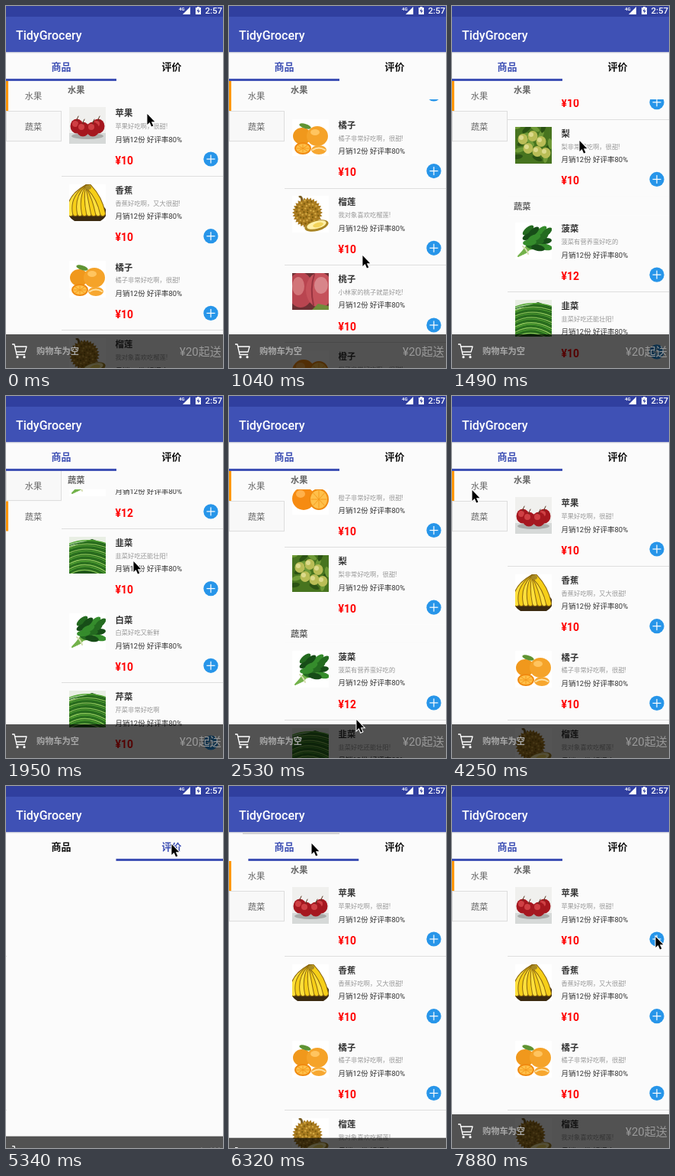
Animation, 285 px wide and 473 px high, one loop 8000 ms. Source, as an HTML page with a canvas:

```html
<!DOCTYPE html>
<html lang="zh-CN">
<head>
<meta charset="utf-8">
<title>Shop menu</title>
<style>
html, body { margin: 0; width: 100%; height: 100%; overflow: hidden; background: #fafafa; }
canvas { display: block; width: 285px; height: 473px; }
</style>
</head>
<body>
<canvas id="stage" width="285" height="473"></canvas>
<script>
const ctx = document.getElementById('stage').getContext('2d');
const W = 285, H = 473, LOOP = 8000;
const TOP = 98, HEAD = 24, ROW = 100.7, TAB = 145;
const BLUE = '#3f51b5', PAGE = '#fbfbfb';
const FONT = 'Roboto, "Noto Sans CJK SC", "Noto Sans CJK", sans-serif';

const fruit = [
  ['苹果', '苹果好吃啊，很甜!', 10, apples],
  ['香蕉', '香蕉好吃啊，又大很甜!', 10, bananas],
  ['橘子', '橘子非常好吃啊，很甜!', 10, tangerines],
  ['榴莲', '我对象喜欢吃榴莲!', 10, durian],
  ['桃子', '小林家的桃子就是好吃!', 10, peaches],
  ['橙子', '橙子非常好吃啊，很甜!', 10, oranges],
  ['梨', '梨非常好吃啊，很甜!', 10, pears]
];
const greens = [
  ['菠菜', '菠菜有营养蛮好吃的', 12, spinach],
  ['韭菜', '韭菜好吃还能壮阳!', 10, leeks],
  ['白菜', '白菜好吃又新鲜', 10, spinach],
  ['芹菜', '芹菜非常好吃啊', 10, leeks]
];
const GREENS_AT = HEAD + fruit.length * ROW;

// Keyframes: time, then values
const scrollKeys = [
  [0, 0], [40, 0], [180, 70], [380, 135], [600, 170], [810, 183], [1000, 183], [1040, 185],
  [1180, 300], [1340, 450], [1490, 577], [1650, 695], [1800, 755], [1950, 778], [2120, 778],
  [2260, 745], [2400, 655], [2530, 529], [2680, 380], [2850, 255], [3050, 160], [3270, 120],
  [3530, 120]
];
const cursorKeys = [
  [0, 185, 140], [160, 184, 113], [300, 184, 125], [880, 176, 345], [1040, 175, 325],
  [1380, 167, 165], [1490, 167, 175], [1900, 167, 215], [2130, 167, 215], [2530, 167, 422],
  [2640, 167, 430], [3270, 43, 157], [3300, 42, 156], [3560, 42, 156], [3980, 26, 122],
  [4290, 26, 122], [4960, 217, 75], [5670, 217, 75], [5890, 108, 74], [6400, 108, 74],
  [6970, 198, 290], [7760, 263, 199], [7880, 267, 196], [8000, 267, 196]
];

const clamp = v => Math.max(0, Math.min(1, v));
const smooth = u => u * u * (3 - 2 * u);
const ramp = (t, from, to) => smooth(clamp((t - from) / (to - from)));

function sample(keys, t, ease = u => u) {
  const i = keys.findIndex(k => k[0] > t);
  if (i < 0) return keys[keys.length - 1].slice(1);
  const a = keys[i - 1], b = keys[i], u = ease((t - a[0]) / (b[0] - a[0]));
  return a.slice(1).map((v, j) => v + (b[j + 1] - v) * u);
}

function scrollAt(t) {
  if (t < 3530) return sample(scrollKeys, t)[0];
  return t < 4250 ? GREENS_AT : 0;
}

function rect(x, y, w, h, color) {
  ctx.fillStyle = color;
  ctx.fillRect(x, y, w, h);
}

function text(s, x, y, size, color, weight = 400, align = 'left') {
  ctx.font = `${weight} ${size}px ${FONT}`;
  ctx.fillStyle = color;
  ctx.textAlign = align;
  ctx.fillText(s, x, y + size * 0.37);
}

function blob(x, y, rx, ry, color, turn = 0) {
  ctx.fillStyle = color;
  ctx.beginPath();
  ctx.ellipse(x, y, rx, ry, turn, 0, Math.PI * 2);
  ctx.fill();
}

function shape(points, fill, stroke, width = 1) {
  ctx.beginPath();
  points.forEach(([x, y]) => ctx.lineTo(x, y));
  ctx.closePath();
  if (stroke) {
    ctx.strokeStyle = stroke;
    ctx.lineWidth = width;
    ctx.stroke();
  }
  if (fill) {
    ctx.fillStyle = fill;
    ctx.fill();
  }
}

function curve(x1, y1, cx, cy, x2, y2, color, width) {
  ctx.strokeStyle = color;
  ctx.lineWidth = width;
  ctx.lineCap = 'round';
  ctx.beginPath();
  ctx.moveTo(x1, y1);
  ctx.quadraticCurveTo(cx, cy, x2, y2);
  ctx.stroke();
}

// Produce pictures, each on a 48 px square
function apples() {
  rect(0, 0, 48, 48, '#f0f0ee');
  rect(0, 34, 48, 14, '#d6d9d8');
  blob(24, 38, 21, 4, '#a9aaa8');
  for (const [x, y] of [[10, 25], [38, 25], [18, 29], [31, 29]]) {
    blob(x, y, 8.5, 9.5, '#a5171f');
    blob(x - 2, y - 3, 4, 4, '#cf4044');
    curve(x, y - 7, x, y - 10, x + 2, y - 13, '#5a3a24', 1);
  }
}

function bananas() {
  rect(0, 0, 48, 48, '#fff');
  blob(24, 37, 25, 15, '#3b2a10');
  for (let i = 0; i < 8; i++) {
    const x = 2 + i * 6;
    curve(23 + i * 0.5, 4, x - 4, 18, x, 38, '#8a6610', 8);
    curve(23 + i * 0.5, 4, x - 4, 18, x, 38, i % 2 ? '#f6cf18' : '#ffe03c', 6);
  }
  blob(25, 4, 4, 3, '#a88a24');
}

function slice(x, y, rx, ry) {
  blob(x, y, rx, ry, '#f08a10');
  blob(x, y, rx - 2, ry - 2, '#ffc04a');
  for (let i = 0; i < 8; i++) {
    const a = i * Math.PI / 4;
    curve(x, y, x, y, x + Math.cos(a) * (rx - 3), y + Math.sin(a) * (ry - 3), '#f59a1c', 1);
  }
}

function tangerines() {
  rect(0, 0, 48, 48, '#fff');
  blob(13, 22, 12, 11, '#f0981c');
  blob(33, 22, 14, 13, '#f5a329');
  blob(30, 17, 6, 4, '#ffc560');
  blob(17, 9, 8, 3, '#5f9434', 0.3);
  slice(14, 38, 11, 8);
  blob(35, 40, 10, 6, '#f7a730');
  curve(27, 40, 35, 35, 43, 40, '#ffe1a0', 2);
}

function durian() {
  rect(0, 0, 48, 48, '#fff');
  const spikes = Array.from({ length: 56 }, (_, i) => {
    const a = i * Math.PI / 28, r = i % 2 ? 17 : 20;
    return [20 + Math.cos(a) * r, 22 + Math.sin(a) * r];
  });
  shape(spikes, '#a97b20');
  for (let i = 0; i < 50; i++) {
    const a = i * 2.4, r = Math.sqrt(i) * 2.3;
    blob(20 + Math.cos(a) * r, 22 + Math.sin(a) * r, 1.2, 1.2, i % 2 ? '#d4aa42' : '#81600f');
  }
  curve(13, 5, 12, 1, 10, 1, '#7c6127', 3);
  blob(32, 39, 16, 7, '#a98524', -0.25);
  blob(32, 38, 13, 5, '#fff0a8', -0.25);
  blob(34, 38, 7, 3, '#f2d45c', -0.25);
}

function peaches() {
  rect(0, 0, 48, 48, '#6d3034');
  blob(11, 22, 17, 23, '#b94550');
  blob(36, 22, 18, 23, '#c5525b');
  blob(8, 17, 8, 12, '#d27579');
  blob(38, 16, 9, 11, '#d8858a');
  curve(29, 2, 23, 20, 28, 42, '#983440', 2);
  shape([[26, 48], [34, 40], [48, 43], [48, 48]], '#718c3b');
}

function oranges() {
  rect(0, 0, 48, 48, '#fff');
  blob(15, 27, 15, 15, '#f68b12');
  blob(11, 21, 6, 5, '#ffb14b');
  slice(35, 28, 13, 14);
}

function pears() {
  rect(0, 0, 48, 48, '#47741f');
  for (let i = 0; i < 16; i++)
    blob(i * 17 % 48, i * 29 % 48, 7, 3, i % 2 ? '#2b5214' : '#6f9a37', i);
  for (const [x, y] of [[10, 16], [23, 12], [34, 19], [17, 28], [29, 32], [40, 34]]) {
    blob(x, y, 6.5, 7, '#b9bd56');
    blob(x - 2, y - 2, 3, 3, '#dcda8c');
  }
}

function spinach() {
  rect(0, 0, 48, 48, '#fff');
  for (let i = 0; i < 9; i++)
    curve(4 + i * 1.5, 44 - i * 0.7, 16, 32, 28 + i * 1.7, 10 + i * 3, '#74b34c', 2);
  for (let i = 0; i < 14; i++)
    blob(17 + i * 11 % 27, 10 + i * 7 % 27, 9, 4, ['#246b20', '#358c2c', '#174d18'][i % 3], -0.7 + i % 4 * 0.3);
  curve(10, 31, 15, 35, 17, 41, '#d5ddb0', 2);
}

function leeks() {
  rect(0, 0, 48, 48, '#20571a');
  shape([[0, 0], [48, 0], [48, 9], [30, 3], [0, 13]], '#e9efe4');
  for (let i = 0; i < 18; i++)
    curve(-2, 10 + i * 2.4, 22, i * 2, 50, 9 + i * 2.7, ['#52a832', '#2e7a21', '#8bcb58'][i % 3], 1.3);
}

function row([name, note, price, picture], y, lined) {
  if (y > H || y + ROW < TOP) return;
  ctx.save();
  ctx.translate(83, Math.round(y + 10));
  ctx.beginPath();
  ctx.rect(0, 0, 48, 48);
  ctx.clip();
  picture();
  ctx.restore();
  text(name, 143.5, y + 18, 11.4, '#333', 700);
  text(note, 143.5, y + 35, 8.3, '#999');
  text('月销12份 好评率80%', 143.5, y + 52, 9.5, '#333');
  text('¥' + price, 143.5, y + 79.5, 14, '#f00', 700);
  const cy = y + 78;
  blob(269, cy, 9.6, 9.6, '#2795e9');
  rect(263.5, cy - 0.6, 11, 1.2, '#fff');
  rect(268.4, cy - 5.5, 1.2, 11, '#fff');
  if (lined) rect(73, Math.round(y + ROW - 0.7), W - 73, 1, '#dedede');
}

function heading(label, y) {
  rect(73, y, W - 73, HEAD, PAGE);
  text(label, 81, y + 12.3, 11.2, '#666', 700);
}

function menu(selected) {
  rect(0, TOP, 73, H - TOP, '#fbfbfb');
  ['水果', '蔬菜'].forEach((label, i) => {
    const y = TOP + i * 39.5;
    if (i === selected) {
      rect(0, y, 3, 39, '#ff9800');
    } else {
      rect(0, Math.round(y), 73, 40, '#f8f8f8');
      ctx.strokeStyle = '#dedede';
      ctx.lineWidth = 1;
      ctx.strokeRect(0.5, Math.round(y) - 0.5, 72, 39);
    }
    text(label, 36, y + 20, 11.2, '#666', 400, 'center');
  });
}

function goods(scroll, slide) {
  ctx.save();
  ctx.beginPath();
  ctx.rect(0, TOP, W, H - TOP);
  ctx.clip();
  ctx.translate(-W * slide, 0);
  const greensY = TOP + GREENS_AT - scroll;
  fruit.forEach((item, i) => row(item, TOP + HEAD + i * ROW - scroll, i !== 1 && i < 6));
  greens.forEach((item, i) => row(item, greensY + HEAD + i * ROW, i !== 1));
  heading('蔬菜', Math.max(TOP, greensY));
  if (greensY > TOP) heading('水果', Math.min(TOP, greensY - HEAD));
  menu(scroll >= GREENS_AT ? 1 : 0);
  ctx.restore();
}

function topBars(t, tabShift) {
  rect(0, 60, W, 38, PAGE);
  rect(0, 0, W, 14, '#303f9f');
  rect(0, 14, W, 46, BLUE);
  rect(0, 60, W, 1, '#c4c7d8');
  rect(0, 61, W, 1, '#ebebef');
  if (t >= 6290 && t < 6400) rect(18, 60, 127, 3, '#d2d2d4');
  text('TidyGrocery', 13, 37.8, 16, '#fff', 500);
  text('4G', 227, 4, 6, '#fff', 700);
  shape([[232, 11], [242, 11], [242, 1]], '#fff');
  rect(249, 2, 7, 9, '#fff');
  rect(251, 1, 3, 1, '#fff');
  shape([[253, 3], [250.5, 7], [252.5, 7], [252, 10], [254.8, 6], [252.7, 6]], '#303f9f');
  text('2:57', 261.5, 5.7, 11.5, '#fff', 500);
  const rated = t >= 5080 && t < 6150;
  text('商品', TAB / 2, 79, 13, rated ? '#111' : BLUE, 700, 'center');
  text('评价', TAB * 1.5, 79, 13, rated ? BLUE : '#111', 700, 'center');
  rect(TAB * tabShift, 95, TAB, 3, BLUE);
}

function cart(drop) {
  if (drop >= 1) return;
  ctx.save();
  ctx.translate(0, 44 * drop);
  rect(0, 429, W, 44, 'rgba(0,0,0,.67)');
  ctx.strokeStyle = '#fff';
  ctx.lineWidth = 1.3;
  ctx.lineJoin = 'round';
  ctx.beginPath();
  for (const [x, y] of [[8, 442], [11, 442], [14, 455.5], [25, 455.5]]) ctx.lineTo(x, y);
  ctx.moveTo(12, 445);
  for (const [x, y] of [[27, 445], [25, 452], [13.5, 452]]) ctx.lineTo(x, y);
  ctx.stroke();
  blob(15, 458.7, 1.6, 1.6, '#fff');
  blob(24, 458.7, 1.6, 1.6, '#fff');
  text('购物车为空', 40, 451, 11.2, '#a8a8a8', 700);
  text('¥20起送', 228, 451, 15, '#999');
  ctx.restore();
}

function cursor(x, y) {
  ctx.save();
  ctx.translate(x + 0.5, y + 1);
  shape([[0, 0], [0, 14], [3.2, 11], [5.6, 16.6], [7.9, 15.6], [5.4, 10.3], [9.8, 10.3]], '#000', '#fff', 2);
  ctx.restore();
}

function draw(t) {
  const slide = ramp(t, 5080, 5350) - ramp(t, 6150, 6310);
  const tabShift = ramp(t, 5080, 5350) - ramp(t, 6150, 6383);
  const drop = ramp(t, 5100, 5500) - ramp(t, 6250, 6445);
  rect(0, 0, W, H, PAGE);
  goods(scrollAt(t), slide);
  topBars(t, tabShift);
  cart(drop);
  cursor(...sample(cursorKeys, t, smooth));
}

const start = performance.now();
function tick() {
  draw((performance.now() - start) % LOOP);
  requestAnimationFrame(tick);
}
tick();
</script>
</body>
</html>
```
